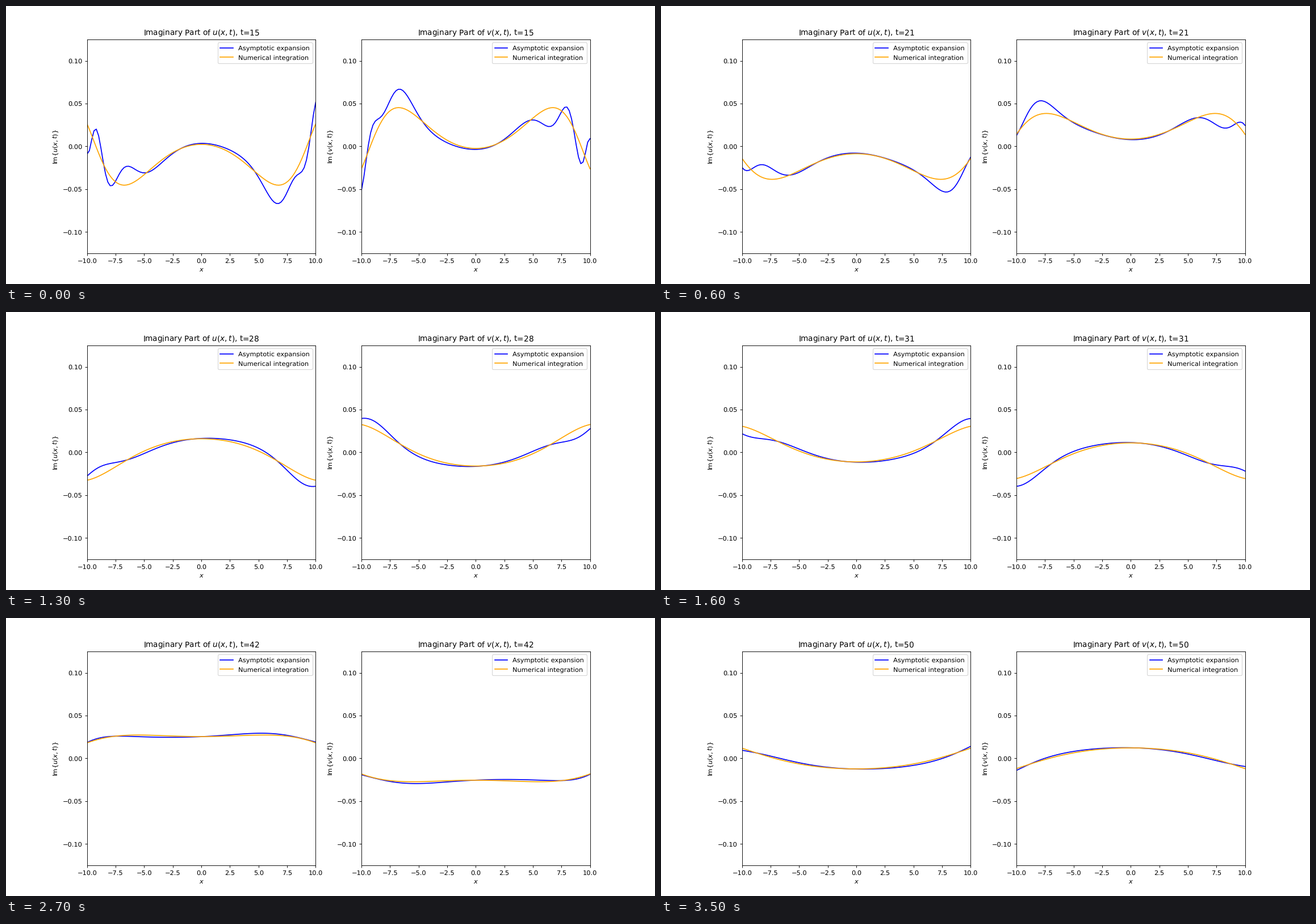
Recreate the animation shown at these times as a matplotlib script. Size 1143 px wide and 490 px high, loop 3600 ms.

```python
import numpy as np
import matplotlib.pyplot as plt
from matplotlib.animation import FuncAnimation

plt.rcParams.update({
    "font.family": "DejaVu Sans",
    "text.hinting": "none",
    "legend.labelspacing": 0.54,
    "legend.borderpad": 0.42,
})

DPI = 81.65
T_START, FRAMES, INTERVAL = 15, 36, 100
AMPLITUDE = 0.25  # height of the Gaussian initial pulse

x = np.linspace(-10, 10, 100)
k_grid = np.linspace(-8, 8, 1601)
COS_KX = np.cos(np.outer(x, k_grid))


def spectrum(k):
    return AMPLITUDE * np.sqrt(np.pi) * np.exp(-k**2 / 4)


def integrated(t):
    """Fourier integral for Im v; Im u is its mirror image with opposite sign."""
    omega = np.sqrt(1 + k_grid**2)
    integrand = spectrum(k_grid) * np.sin(omega * t) / omega
    return COS_KX @ integrand * (k_grid[1] - k_grid[0]) / (2 * np.pi)


def asymptotic(t):
    """Stationary-phase estimate for Im v."""
    s = np.sqrt(t**2 - x**2)
    k, omega = x / s, t / s
    theta = omega * t - np.pi / 4
    envelope = spectrum(k) / np.sqrt(2 * np.pi * s)
    return envelope * ((1 - k) * np.cos(theta) * np.cos(k * x)
                       + omega * np.sin(theta) * np.sin(k * x))


fig, axes = plt.subplots(1, 2, figsize=(1143 / DPI, 490 / DPI), dpi=DPI)
fig.subplots_adjust(left=0.1249, right=0.8999, bottom=0.11, top=0.88, wspace=0.2)

panels = []
for ax, name in zip(axes, "uv"):
    blue, = ax.plot([], [], color="blue", label="Asymptotic expansion")
    orange, = ax.plot([], [], color="orange", label="Numerical integration")
    ax.set(xlim=(-10, 10), ylim=(-0.125, 0.125), xlabel="$x$",
           ylabel=rf"Im$\{{{name}(x,t)\}}$")
    ax.set_yticks(np.linspace(-0.1, 0.1, 5))
    ax.legend(loc="upper right")
    panels.append((ax, name, blue, orange))


def update(frame):
    t = T_START + frame
    for ax, name, blue, orange in panels:
        expansion, integral = asymptotic(t), integrated(t)
        if name == "u":
            expansion, integral = -expansion[::-1], -integral[::-1]
        blue.set_data(x, expansion)
        orange.set_data(x, integral)
        ax.set_title(f"Imaginary Part of ${name}(x,t)$, t={t}")
    return []


animation = FuncAnimation(fig, update, frames=FRAMES, interval=INTERVAL,
                          repeat=True, repeat_delay=0, blit=False)
plt.show()
```
